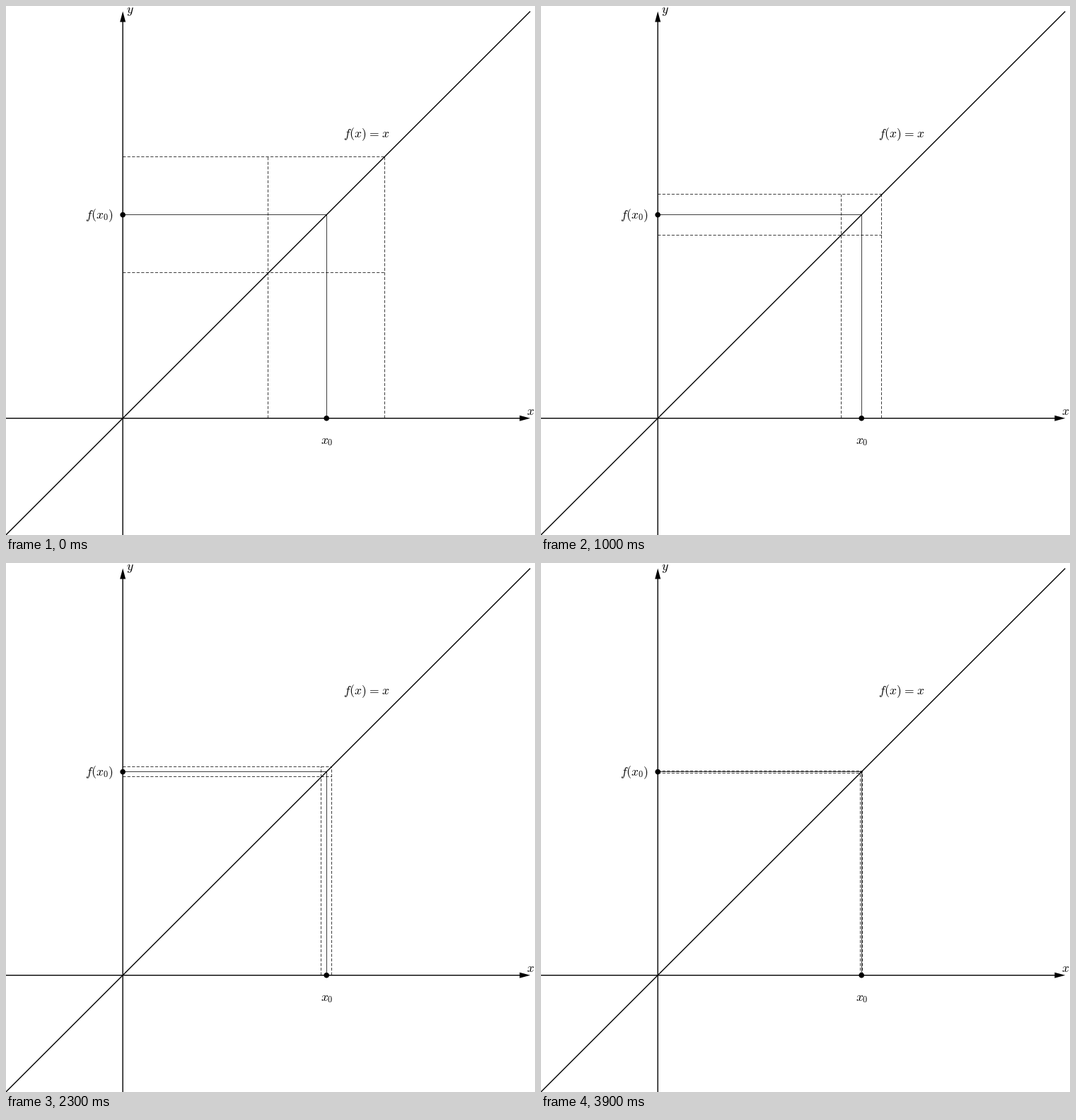
Recreate the animation shown at these times as a matplotlib script. Size 748 by 749 pixels, loop 4000 ms.

```python
import math

import matplotlib.pyplot as plt
from matplotlib.animation import FuncAnimation
from matplotlib.patches import Circle, Polygon

W, H, DPI = 748, 749, 72
FRAMES, INTERVAL = 40, 100
OX, OY, UNIT = 165.15, 583.7, 82.3   # origin and unit length in pixels
X0, END = 3.5, 7
SHRINK = 0.9                         # factor on the half-width per frame

plt.rcParams["mathtext.fontset"] = "cm"

fig = plt.figure(figsize=(W / DPI, H / DPI), dpi=DPI, facecolor="white")
ax = fig.add_axes([0, 0, 1, 1])
ax.set_xlim(0, W)
ax.set_ylim(H, 0)
ax.axis("off")


def sx(x):
    return OX + UNIT * x


def sy(y):
    return OY - UNIT * y


def crisp(v):
    """Centre of the pixel that holds v."""
    return math.floor(v) + 0.5


def line(xs=(), ys=(), width=1.4, z=3, **style):
    style.setdefault("solid_capstyle", "butt")
    return ax.plot(xs, ys, color="black", lw=width, zorder=z,
                   snap=False, **style)[0]


def label(x, y, text):
    ax.text(x, y, text, fontsize=17.5, ha="left", va="baseline", zorder=6)


def arrow_head(tip, direction, length=15, half=4):
    (tx, ty), (dx, dy) = tip, direction
    bx, by = tx - dx * length, ty - dy * length
    ax.add_patch(Polygon([(tx, ty), (bx - dy * half, by + dx * half),
                          (bx + dy * half, by - dx * half)],
                         fc="black", ec="none", zorder=4))


def dot(x, y):
    ax.add_patch(Circle((x, y), 3.8, fc="black", ec="none", zorder=5))


# Axes and the graph of the identity
line([0, sx(END) - 10], [OY, OY])
line([OX, OX], [H, sy(END) + 10])
arrow_head((sx(END), OY), (1, 0))
arrow_head((OX, sy(END)), (0, -1))
line([sx(-2.1), sx(END)], [sy(-2.1), sy(END)])

# Fixed point and its image
px, py = crisp(sx(X0)), crisp(sy(X0))
line([px, px, OX], [OY, py, py], width=0.75, z=2, solid_joinstyle="miter")
dot(sx(X0), OY)
dot(OX, sy(X0))

label(170, 10.5, r"$y$")
label(736, 579, r"$x$")
label(477, 186, r"$f(x)\hspace{0.07}=\hspace{0.07}x$")
label(112, 301, r"$f(x_0)$")
label(445, 620, r"$x_0$")

dashes = dict(width=0.75, z=2, linestyle=(0, (5.6, 3.1)), dash_capstyle="butt")
uprights = [line(**dashes) for _ in range(2)]
levels = [line(**dashes) for _ in range(2)]


def update(i):
    delta = SHRINK ** i
    right, top = sx(X0 + delta), sy(X0 + delta)
    for sign, upright, level in zip((-1, 1), uprights, levels):
        x, y = crisp(sx(X0 + sign * delta)), crisp(sy(X0 + sign * delta))
        upright.set_data([x, x], [OY, top])
        level.set_data([OX, right], [y, y])
    return uprights + levels


anim = FuncAnimation(fig, update, frames=FRAMES, interval=INTERVAL,
                     repeat=True, repeat_delay=0, blit=False)
plt.show()
```
